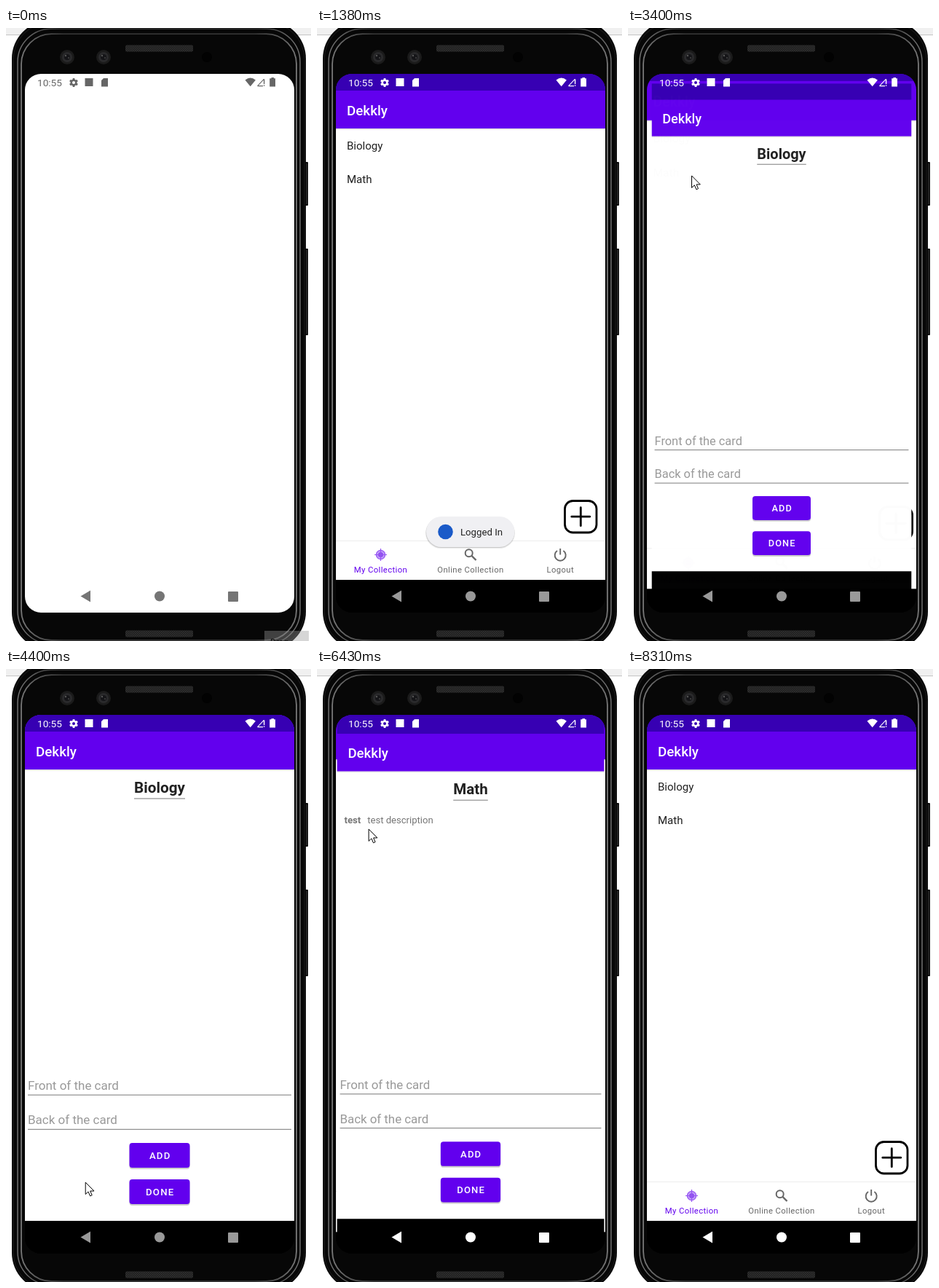
These frames come from a looping animation (419x842 px, 9250 ms). An HTML page:

```html
<!DOCTYPE html>
<html lang="en">
<head>
<meta charset="utf-8">
<title>Flashcard app</title>
<style>
  html, body { margin: 0; height: 100%; overflow: hidden; background: #fff; }
  svg { display: block; width: 419px; height: 842px; font-family: Roboto, sans-serif; }
  text { white-space: pre; }
  .mid { text-anchor: middle; }
  .label { font-size: 11.3px; letter-spacing: .38px; fill: #666; }
  .hint { font-size: 17px; fill: #999; }
  .note { font-size: 13.2px; fill: #757575; }
  .button { font-size: 13.2px; font-weight: 500; letter-spacing: 1.18px; fill: #fff; }
</style>
</head>
<body>
<svg id="stage" viewBox="0 0 419 842"></svg>
<script>
const LOOP = 9250;
const rect = (x, y, w, h, fill, r = 0, more = '') =>
  `<rect x="${x}" y="${y}" width="${w}" height="${h}" rx="${r}" fill="${fill}" ${more}/>`;
const circle = (x, y, r, fill, more = '') =>
  `<circle cx="${x}" cy="${y}" r="${r}" fill="${fill}" ${more}/>`;
const text = (x, y, s, more) => `<text x="${x}" y="${y}" ${more}>${s}</text>`;
const path = (d, more = '') => `<path d="${d}" ${more}/>`;
const group = (id, body, more = '') => `<g id="${id}" ${more}>${body}</g>`;
const outline = (color, width) => `fill="none" stroke="${color}" stroke-width="${width}"`;

const appWindow = (id, body) => group(id,
  rect(26, 137, 370, 622, '#fff') + body +
  rect(26, 138, 370, 1.5, '#000', 0, 'opacity=".12"') +
  rect(26, 63, 370, 75, '#6200ee') + rect(26, 63, 370, 23, '#3700b3') +
  text(41, 119.5, 'Dekkly', 'font-size="18.8" font-weight="500" fill="#fff"') +
  rect(26, 758, 370, 45, '#000'));

const home = appWindow('home',
  group('rowBiology', rect(26, 139, 370, 45, '#e0e0e0')) +
  group('rowMath', rect(26, 184, 370, 46, '#e0e0e0')) +
  ['Biology', 'Math'].map((name, i) =>
    text(41, 167 + 45.5 * i, name, 'font-size="15" fill="#212121"')).join('') +
  rect(340.5, 649.5, 43.5, 43.5, '#fff', 11, 'stroke="#000" stroke-width="2.8"') +
  path('M349.8 671.2h25M362.3 658.7v25', outline('#000', 2.8) + ' stroke-linecap="round"') +
  rect(26, 704, 370, 1, '#ededed') +
  circle(87.5, 723.5, 6, '#c8a8fa', 'stroke="#a064f4" stroke-width="1.7"') +
  circle(87.5, 723.5, 3.6, '#9050f0') +
  path('M87.5 715v17M79 723.5h17', outline('#9656f1', 1.2)) +
  circle(208.7, 721.2, 5, 'none', 'stroke="#666" stroke-width="2"') +
  path('M212.5 725l6 6', outline('#666', 2.4)) +
  path('M330 718a7.5 7.5 0 1 0 8.4 0M334.2 715v8.5', outline('#666', 1.9)) +
  text(87.5, 748, 'My Collection', 'class="label mid" style="fill:#6200ee"') +
  text(211, 748, 'Online Collection', 'class="label mid"') +
  text(334.3, 748, 'Logout', 'class="label mid"'));

const field = (y, s) => text(30, y, s, 'class="hint"') + rect(30, y + 6.6, 362, 1, '#777');
const button = (y, s) =>
  rect(169.5, y + 1.5, 83, 34.5, '#000', 4, 'opacity=".2"') +
  rect(169.5, y, 83, 34, '#6200ee', 4) + text(211.7, y + 21.8, s, 'class="button mid"');
const deck = (name, width, cards) => appWindow('deck' + name,
  text(211, 170, name, 'class="mid" font-size="20.7" font-weight="700" fill="#212121"') +
  rect(211 - width / 2, 177.5, width, 1, '#777') + cards +
  field(578, 'Front of the card') + field(625.2, 'Back of the card') +
  button(651, 'ADD') + button(701, 'DONE'));

const rim = (inset, color, width) =>
  rect(8 + inset, -10 + inset * 1.4, 404 - 2 * inset, 864 - 2.4 * inset, 'none', 52 - inset * .8,
    `stroke="${color}" stroke-width="${width}"`);
const speaker = y => rect(164, y, 93, 9, '#1c1c1c', 2) + rect(164, y, 93, 9, 'url(#mesh)', 2);
const lens = x => circle(x, 40, 10, '#1b1b1b') + circle(x, 40, 7, '#2a2a2c') +
  circle(x, 40, 4, '#151518') + circle(x - 2, 38, 1.2, '#555') + circle(x + 2, 41, 1, '#444');
const sideKey = (y, h) => rect(409, y, 6, h, '#0c0c0c', 1) + rect(412.5, y + 2, 1, h - 4, '#3a3a3a');

const gear = [0, 60, 120].map(a =>
  rect(91.6, 69, 2.8, 12, 'currentColor', .5, `transform="rotate(${a} 93 75)"`)).join('') +
  circle(93, 75, 3.4, 'none', 'stroke="currentColor" stroke-width="2.4"') +
  circle(93, 75, 2, 'var(--bar)');
const status = group('status',
  text(43, 79.7, '10:55', 'font-size="13.6" fill="currentColor"') + gear +
  rect(108.5, 69, 11, 11, 'currentColor') +
  path('M134 69h6v11.5h-9V72z', 'fill="currentColor"') +
  path('M328.5 71.5q7.2-6.2 14.4 0l-7.2 8.8z', 'fill="currentColor"') +
  path('M345.5 79.6h7.5M345.5 79.6l9-9.5', outline('currentColor', 1.1)) +
  path('M354.6 70.5v6.5m0 1.2v1.6', outline('currentColor', 1.4)) +
  path('M364.5 68h3.5v1.3h2v11.2h-7.8V69.3h2.3z', 'fill="currentColor"'));

const stage = document.getElementById('stage');
stage.innerHTML = `<defs>
  <clipPath id="screen">${rect(26, 63, 370, 740, '#fff', 22)}</clipPath>
  <clipPath id="bar">${rect(26, 761, 370, 42, '#fff')}</clipPath>
  <pattern id="mesh" width="3" height="3" patternUnits="userSpaceOnUse">
    ${rect(0, 0, 1.5, 1.5, '#333')}${rect(1.5, 1.5, 1.5, 1.5, '#303030')}</pattern>
  <linearGradient id="metal" x2="1" y2="0"><stop stop-color="#777"/>
    <stop offset=".15" stop-color="#333"/><stop offset=".85" stop-color="#333"/>
    <stop offset="1" stop-color="#777"/></linearGradient></defs>` +
  rect(0, 0, 419, 842, '#fff') + rect(0, 0, 419, 9, '#f0f0f0') + rect(0, 9, 419, 1, '#c4c4c4') +
  sideKey(184, 60) + sideKey(303, 119) +
  rect(8, -10, 404, 864, '#070707', 52) +
  rim(2, '#1c1c1c', 1) + rim(8, 'url(#metal)', 1.4) + rim(13, 'url(#metal)', 1.8) +
  speaker(23.5) + speaker(827.5) + lens(84) + lens(134) + circle(276, 40, 7, '#020202') +
  `<g clip-path="url(#screen)">` + rect(26, 63, 370, 740, '#000') +
  group('blank', rect(26, 63, 370, 740, '#fff')) + home +
  deck('Biology', 70, '') +
  deck('Math', 48, text(36, 210, 'test', 'class="note" font-weight="700"') +
    text(68, 210, 'test description', 'class="note"')) +
  status +
  group('press', rect(65, 758, 90, 46, '#222', 20), 'clip-path="url(#bar)"') +
  group('keys', path('M102.5 780.5l13.5-8v16z') +
    `<circle cx="211" cy="780.5" r="7"/><rect x="305" y="774" width="14" height="14" rx="1"/>`) +
  group('toast',
    rect(149, 673, 123, 42, '#000', 21, 'opacity=".08"') +
    rect(149.5, 672, 122, 42, '#000', 21, 'opacity=".14"') +
    rect(150, 671, 121.5, 42, '#f0f0f3', 21) + circle(176.5, 692, 10.3, '#1a5ac8') +
    text(197, 696.8, 'Logged In', 'font-size="13.2" fill="#222"')) +
  `</g>` +
  group('tip', rect(355, 828, 61, 14, '#999', 0, 'opacity=".4"') +
    text(363, 848, 'Drag', 'font-size="12" fill="#111"')) +
  group('cursor', path('M0 0v16.5l3.8-3.6 2.6 6 2.6-1.2-2.5-5.7h5.3z',
    'fill="#fff" stroke="#000" stroke-width="1"'));

const el = {};
stage.querySelectorAll('g[id]').forEach(g => el[g.id] = g);

const clamp = v => Math.max(0, Math.min(1, v));
const ramp = (t, start, length) => clamp((t - start) / length);
const cubic = (u, a, b, c, d) =>
  a * (1 - u) ** 3 + 3 * b * u * (1 - u) ** 2 + 3 * c * u * u * (1 - u) + d * u ** 3;

// Two joined cubics: fast out, extra slow in.
function ease(x) {
  if (x <= 0 || x >= 1) return clamp(x);
  const [xs, ys] = x < 1 / 6
    ? [[0, .05, .1333, 1 / 6], [0, 0, .06, .4]]
    : [[1 / 6, .2083, .25, 1], [.4, .82, 1, 1]];
  let lo = 0, hi = 1;
  for (let i = 0; i < 20; i++) {
    const u = (lo + hi) / 2;
    if (cubic(u, ...xs) < x) lo = u; else hi = u;
  }
  return cubic(lo, ...ys);
}

const fade = (name, alpha) => {
  el[name].setAttribute('opacity', alpha);
  el[name].style.display = alpha > 0 ? '' : 'none';
};
const pose = (name, scale, alpha) => {
  el[name].setAttribute('transform', `translate(211 433) scale(${scale}) translate(-211 -433)`);
  fade(name, alpha);
};
const pulse = (t, start, hold, out) => ramp(t, start, 60) * (1 - ramp(t, start + hold, out));

const LAUNCH = 950;
const visits = [['Biology', 3304, 5120], ['Math', 6240, 7800]];
const track = [
  [1780, 338, 842], [2200, 230, 480], [2670, 82, 188], [2950, 90, 163], [3270, 90, 165],
  [3400, 87, 203], [3700, 92, 330], [4540, 112, 780], [5080, 110, 780], [5270, 75, 570],
  [5670, 75, 214], [6230, 72, 205], [6430, 70, 220], [6660, 200, 318], [7050, 292, 560],
  [7590, 123, 777], [7900, 120, 780], [8310, 150, 844]];

function pointer(t) {
  const i = track.findIndex(k => k[0] > t);
  if (i < 1) return null;
  const [t0, x0, y0] = track[i - 1], [t1, x1, y1] = track[i];
  const p = (t - t0) / (t1 - t0);
  return [x0 + (x1 - x0) * p, y0 + (y1 - y0) * p];
}

function draw(t) {
  const launch = ease((t - LAUNCH) / 400);
  let homeScale = .85 + .15 * launch;
  pose('blank', 1 + .05 * launch, launch < 1 ? 1 : 0);
  for (const [name, open, close] of visits) {
    const inward = ease((t - open) / 400), outward = ease((t - close) / 400);
    if (t >= close) homeScale = 1.1 - .1 * outward;
    else if (t >= open) homeScale = 1 + .05 * inward;
    pose('deck' + name, .85 + .15 * inward - .1 * outward,
      ramp(t, open + 15, 83) * (1 - ramp(t, close + 35, 83)));
    fade('row' + name, pulse(t, open - 200, 130, 100));
  }
  pose('home', homeScale, ramp(t, LAUNCH + 15, 83));

  const launched = t >= LAUNCH + 60;
  el.status.style.color = launched ? '#fff' : '#666';
  el.status.style.setProperty('--bar', launched ? '#3700b3' : '#fff');
  el.keys.setAttribute('fill', !launched ? '#757575' : t < 4800 ? '#999' : '#fff');
  fade('press', Math.max(pulse(t, 5000, 270, 250), pulse(t, 7740, 180, 250)));
  fade('toast', ramp(t, 70, 400) * (1 - ramp(t, 1900, 400)));
  fade('tip', 1 - ramp(t, 70, 240));

  const at = pointer(t);
  fade('cursor', at ? 1 : 0);
  if (at) el.cursor.setAttribute('transform', `translate(${at[0] + .5} ${at[1] - .5})`);
}

function tick() {
  draw(performance.now() % LOOP);
  requestAnimationFrame(tick);
}
tick();
</script>
</body>
</html>
```
